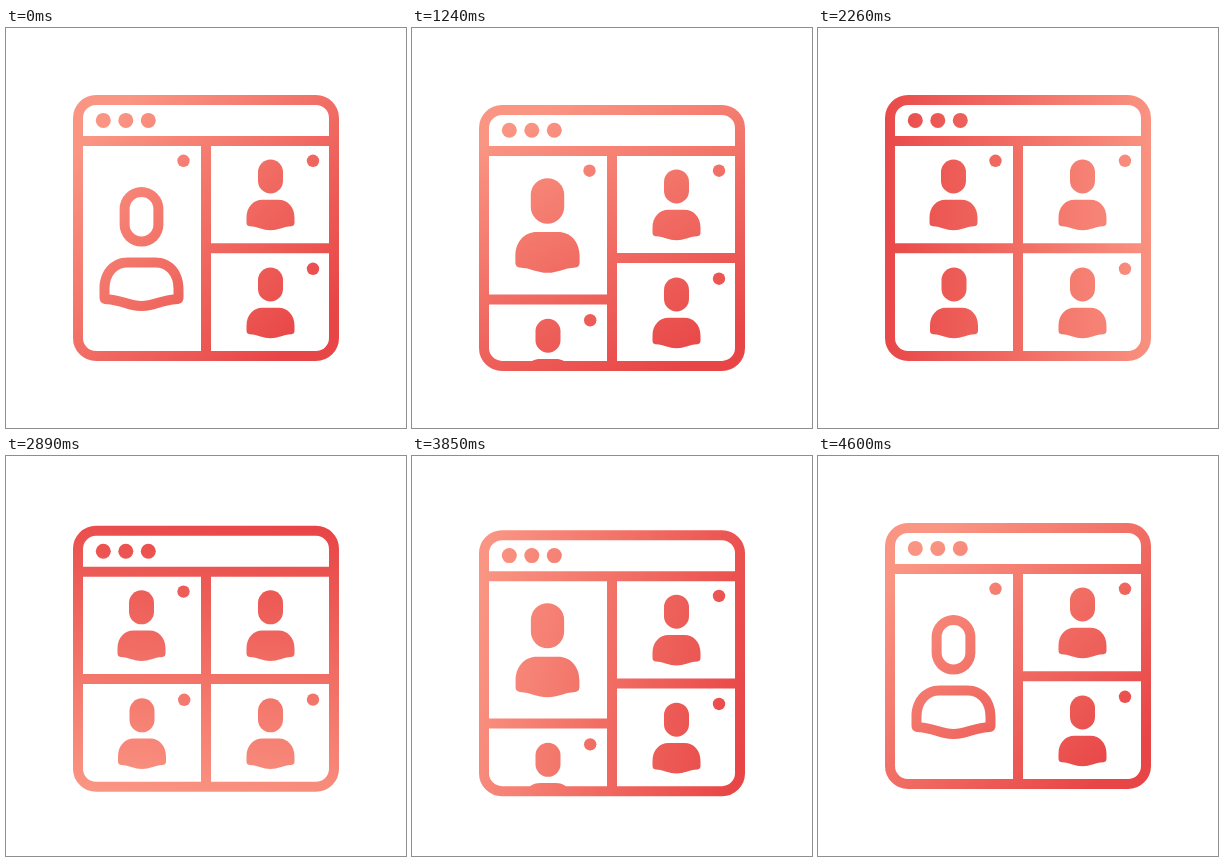
Animation of 400 by 400 pixels, one loop 4.66 s. Source, as an HTML page with a canvas:

```html
<!DOCTYPE html>
<html lang="en">
<head>
<meta charset="utf-8">
<title>Video call</title>
<style>
  html, body { margin: 0; width: 100%; height: 100%; overflow: hidden; background: #fff; }
  canvas { display: block; width: 400px; height: 400px; }
</style>
</head>
<body>
<canvas width="400" height="400"></canvas>
<script>
const ctx = document.querySelector('canvas').getContext('2d');
const LOOP = 4660, SHRINK = 1000, NUDGE = 2710, GROW = 3670;
const LIGHT = '#fa9583', DARK = '#e84646';

const clamp = x => Math.min(1, Math.max(0, x));
const mix = (a, b, k) => a + (b - a) * k;
const within = (t, spans) => spans.some(([a, b]) => t >= a && t < b);

// Cubic Bezier easing with control heights 0 and 1
function bezier(x1, x2) {
  return x => {
    x = clamp(x);
    let lo = 0, hi = 1, s = x;
    for (let i = 0; i < 24; i++) {
      s = (lo + hi) / 2;
      const at = 3 * x1 * s * (1 - s) ** 2 + 3 * x2 * s * s * (1 - s) + s ** 3;
      if (at < x) lo = s; else hi = s;
    }
    return s * s * (3 - 2 * s);
  };
}
const slide = bezier(.4, .2), settle = bezier(.33, .4);
const smooth = x => { x = clamp(x); return x * x * (3 - 2 * x); };

// Direction of the dark end, in degrees clockwise from the right
const turns = [[0, 45], [1000, 45], [1480, 78], [2090, 176], [2700, 182],
  [2890, 278], [3160, 315], [3670, 315], [3850, 372], [4600, 405], [LOOP, 405]];
function angleAt(t) {
  const i = turns.findIndex(([end], n) => n && t <= end);
  const [t0, a0] = turns[i - 1], [t1, a1] = turns[i];
  return mix(a0, a1, (t - t0) / (t1 - t0)) * Math.PI / 180;
}

const hop = dt => 11 * (smooth(dt / 300) - settle((dt - 300) / 380));
const nudge = dt => 3 * Math.sin(Math.PI * clamp(dt / 430)) ** 2;

const head = new Path2D();
head.roundRect(-12.5, -35.25, 25, 34, 12.5);
const torso = new Path2D('M-24 23C-24 12-17 5-8 5H8C17 5 24 12 24 23V28Q24 31 21 31.5' +
  'C12 32 8 35.5 0 35.5S-12 32-21 31.5Q-24 31-24 28Z');

const frame = new Path2D();
frame.roundRect(72, 72, 256, 256, 18);

function dot(x, y, r) {
  ctx.beginPath();
  ctx.arc(x, y, r, 0, 7);
  ctx.fill();
}

function line(x0, y0, x1, y1) {
  ctx.beginPath();
  ctx.moveTo(x0, y0);
  ctx.lineTo(x1, y1);
  ctx.stroke();
}

// An inset turns the figure into an outline of that thickness
function person(x, y, scale = 1, inset = 99) {
  for (const part of [head, torso]) {
    const shape = new Path2D();
    shape.addPath(part, new DOMMatrix([scale, 0, 0, scale, x, y]));
    if (inset > 24) {
      ctx.fill(shape);
      continue;
    }
    ctx.save();
    ctx.clip(shape);
    ctx.lineWidth = inset * 2;
    ctx.stroke(shape);
    ctx.restore();
  }
}

function draw(t) {
  const big = 1 - slide((t - SHRINK) / 600) + slide((t - GROW) / 600);
  const drop = 108 * big;
  const a = angleAt(t), dx = 145 * Math.cos(a), dy = 145 * Math.sin(a);

  ctx.clearRect(0, 0, 400, 400);
  ctx.save();
  ctx.translate(0, hop(t - SHRINK) + nudge(t - NUDGE) + hop(t - GROW));

  const paint = ctx.createLinearGradient(200 - dx, 200 - dy, 200 + dx, 200 + dy);
  paint.addColorStop(0, LIGHT);
  paint.addColorStop(1, DARK);
  ctx.fillStyle = ctx.strokeStyle = paint;
  ctx.lineWidth = 10;

  ctx.save();
  ctx.clip(frame);
  person(135.5, 166.75 + drop / 2, 1 + .75 * big ** .83, 10 + 30 * (1 - big));
  person(136, 274.75 + drop);
  person(264.5, 166.75);
  person(264.5, 274.75);
  if (!within(t, [[3700, 4240]])) dot(177.5, 132.8, 6.2);
  if (!within(t, [[2140, 2620]])) dot(178.2, 241 + drop, 6.2);
  if (!within(t, [[2740, 3310], [3460, 3520]])) dot(307, 132.8, 6.2);
  dot(307, 240.8, 6.2);
  line(72, 220.2 + drop, 200, 220.2 + drop);
  line(200, 220.2, 328, 220.2);
  line(72, 113, 328, 113);
  line(200, 113, 200, 328);
  ctx.restore();

  for (const x of [97.3, 119.8, 142.3]) dot(x, 92.4, 7.5);
  ctx.stroke(frame);
  ctx.restore();
}

const start = performance.now();
function tick() {
  draw((performance.now() - start) % LOOP);
  requestAnimationFrame(tick);
}
tick();
</script>
</body>
</html>
```
